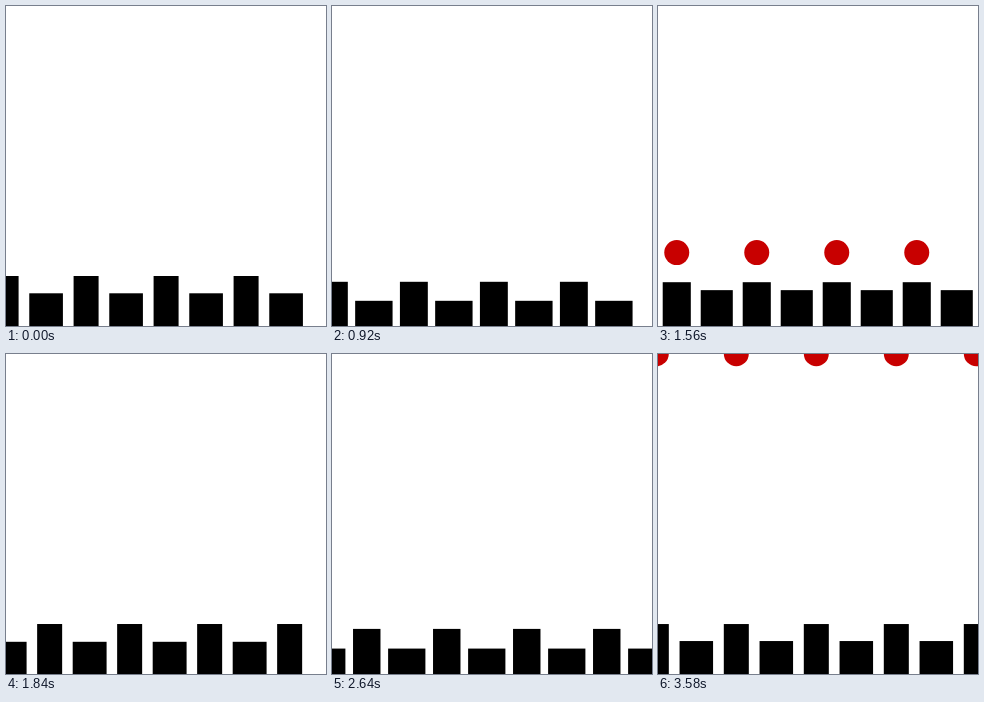
Recreate the animation shown at these times as an HTML page. Size 320 px wide and 320 px high, loop 3600 ms.

```html
<!DOCTYPE html>
<html lang="en">
<head>
<meta charset="utf-8">
<title>Pistons</title>
<style>
  html, body { margin: 0; width: 100%; height: 100%; overflow: hidden; background: #fff; }
  svg { display: block; width: 100vw; height: 100vh; }
</style>
</head>
<body>
<svg id="stage" viewBox="0 0 320 320"></svg>
<script>
const LOOP = 3600, SIZE = 320, GAP = 40, COUNT = 10;
const PRESS = 0.8 * LOOP;   // slow sink, then a quick rise
const RADIUS = 12.5;

// ball height keys: time, y, upward speed per ms
const KEYS = [
  [2880, 308, 0],
  [3240, 280.5, 0.18],
  [3280, 272, 0.24],
  [3360, 247, 0.45],
  [3420, 194.5, 1.15],
  [3580, 1, 1.23],
  [3600, -24, 1.25]
];

const stage = document.getElementById('stage');

function add(tag, fill) {
  const el = document.createElementNS('http://www.w3.org/2000/svg', tag);
  el.setAttribute('fill', fill);
  stage.appendChild(el);
  return el;
}

function set(el, attrs) {
  for (const k in attrs) el.setAttribute(k, attrs[k]);
}

const balls = Array.from({ length: COUNT }, () => add('circle', '#c80000'));
const bars = Array.from({ length: COUNT }, () => add('rect', '#000'));

function barHeight(t) {
  const c = t < PRESS
    ? Math.cos(Math.PI * t / PRESS)
    : -Math.cos(Math.PI * (t - PRESS) / (LOOP - PRESS));
  return 37.5 + 12.5 * c;
}

function ballY(t) {
  const i = KEYS.findIndex((k, n) => n && t < k[0]);
  const [t0, y0, v0] = KEYS[i - 1], [t1, y1, v1] = KEYS[i];
  const d = t1 - t0, u = (t - t0) / d, w = 1 - u;
  return y0 * (1 + 2 * u) * w * w + y1 * u * u * (3 - 2 * u)
    - d * v0 * u * w * w + d * v1 * u * u * w;
}

function draw(t) {
  const shift = (SIZE * t / LOOP) % (2 * GAP);
  for (let i = 0; i < COUNT; i++) {
    const x = (i - 2) * GAP + shift;
    const phase = (t + (i % 2) * LOOP / 2) % LOOP;
    const h = barHeight(phase), w = 50 - h / 2;
    set(bars[i], { x: x - w / 2, y: SIZE - h, width: w, height: h + 1 });
    const live = phase >= PRESS;
    set(balls[i], { cx: x, cy: live ? ballY(phase) : -50, r: RADIUS });
  }
}

const start = performance.now();
function tick() {
  draw((performance.now() - start) % LOOP);
  requestAnimationFrame(tick);
}
tick();
</script>
</body>
</html>
```
